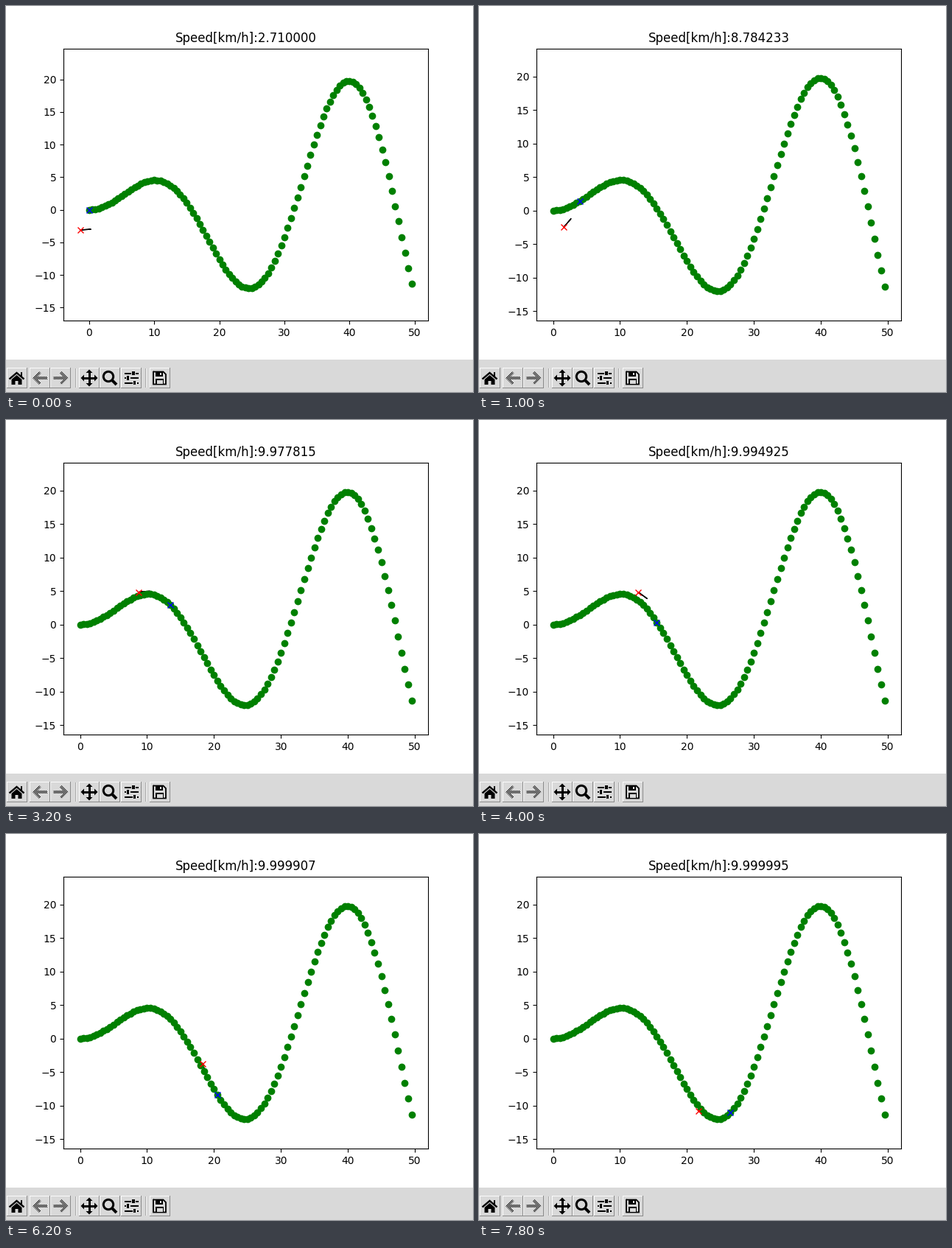
A matplotlib script for the animation above (8 s loop, 634 by 524 pixels).

```python
import math

import matplotlib.pyplot as plt
import numpy as np
from matplotlib.animation import FuncAnimation
from matplotlib.patches import Circle, Polygon, Rectangle

W, H, DPI = 634, 524, 100
FRAMES, INTERVAL = 40, 200
STEPS_PER_FRAME = 3.45
FIRST_STEP = 3

# Vehicle and controller
DT = 0.1
WHEEL_BASE = 2.9
HALF = WHEEL_BASE / 2
LOOK_GAIN = 1.0
LOOK_MIN = 2.0
TARGET_SPEED = 10 / 3.6

BAR = "#d9d9d9"

path_x = np.arange(0, 50, 0.5)
path_y = np.sin(path_x / 5) * path_x / 2


def rear_axle(x, y, yaw):
    return x - HALF * math.cos(yaw), y - HALF * math.sin(yaw)


def simulate(steps):
    """Pure pursuit run: (rear x, rear y, yaw, speed, target index) per step."""
    x, y, yaw, v, target = 0.0, -3.0, 0.0, 0.0, 0
    log = []
    for _ in range(steps + 1):
        log.append((*rear_axle(x, y, yaw), yaw, v, target))
        rx, ry = rear_axle(x, y, yaw)
        look = LOOK_GAIN * v + LOOK_MIN
        dist = np.hypot(path_x - rx, path_y - ry)
        ind = int(dist.argmin())
        while ind + 1 < len(path_x) and dist[ind] < look:
            ind += 1
        target = max(target, ind)
        alpha = math.atan2(path_y[target] - ry, path_x[target] - rx) - yaw
        x += v * math.cos(yaw) * DT
        y += v * math.sin(yaw) * DT
        yaw += v * 2 * math.sin(alpha) / look * DT
        v += (TARGET_SPEED - v) * DT
    return log


def step_at(frame):
    return FIRST_STEP + round(STEPS_PER_FRAME * frame)


states = simulate(step_at(FRAMES - 1))

fig = plt.figure(figsize=(W / DPI, H / DPI), dpi=DPI, facecolor="white")

# Toolbar, drawn in pixel coordinates with y pointing down
bar = fig.add_axes([0, 0, 1, 1], zorder=-1)
bar.set_xlim(0, W)
bar.set_ylim(H, 0)
bar.axis("off")


def rect(x0, y0, x1, y1, color="black"):
    bar.add_patch(Rectangle((x0, y0), x1 - x0, y1 - y0, color=color, lw=0, zorder=3))


def poly(points, color="black"):
    patch = Polygon(points, closed=True, fc=color, lw=0, zorder=3)
    return bar.add_patch(patch)


def line(points, width, color="black"):
    xs, ys = zip(*points)
    bar.plot(xs, ys, color=color, lw=width * 72 / DPI, zorder=3,
             solid_capstyle="butt", solid_joinstyle="miter")


def button(x, top=491, size=28):
    right, bottom = x + size, top + size
    rect(x, top, right, top + 1, "#fbfbfb")
    rect(x, top, x + 1, bottom, "#fbfbfb")
    rect(x, bottom - 1, right, bottom, "#8a8a8a")
    rect(right - 1, top, right, bottom, "#8a8a8a")


def separator(x):
    rect(x, 492, x + 1, 518, "#a8a8a8")
    rect(x + 1, 492, x + 2, 518, "#f4f4f4")


def home_icon():
    line([(4.5, 506.5), (14.5, 498), (24.5, 506.5)], 2.4)
    rect(19.5, 497, 22, 503)
    poly([(7.5, 507), (14.5, 501), (21.5, 507), (21.5, 514), (16.5, 514),
          (16.5, 509), (12.5, 509), (12.5, 514), (7.5, 514)])


def stippled_arrow(cx, side, cy=505):
    half = [(10, 0), (1, 9), (-1.5, 6.5), (3, 2), (-10, 2)]
    shape = half + [(a, -b) for a, b in reversed(half[1:])]
    clip = poly([(cx + side * a, cy + b) for a, b in shape], "none")
    x0, y0, n = int(cx) - 12, cy - 12, 24
    dots = np.indices((n, n)).sum(axis=0) % 2
    image = bar.imshow(dots, extent=(x0, x0 + n, y0 + n, y0), cmap="gray",
                       vmin=0, vmax=1 / 0.85, aspect="auto",
                       interpolation="nearest", zorder=3)
    image.set_clip_path(clip)


def pan_icon(cx=113, cy=505):
    rect(cx - 9, cy - 1.5, cx + 9, cy + 1.5)
    rect(cx - 1.5, cy - 9, cx + 1.5, cy + 9)
    for dx, dy in ((1, 0), (-1, 0), (0, 1), (0, -1)):
        tri = [(11.5, 0), (7, 4.5), (7, -4.5)]
        poly([(cx + a * dx - b * dy, cy + a * dy + b * dx) for a, b in tri])


def zoom_icon():
    bar.add_patch(Circle((139, 503), 6.7, fc="none", ec="black",
                         lw=3 * 72 / DPI, zorder=3))
    line([(143.5, 507.5), (150, 514)], 4)


def sliders_icon():
    for y, knob in ((498.5, 173), (505, 165.5), (511.5, 174.5)):
        rect(160.5, y - 1, 180, y + 1)
        rect(knob - 3, y - 2.5, knob + 3, y + 2.5, BAR)
        rect(knob - 1.7, y - 2.7, knob + 1.7, y + 2.7)


def save_icon():
    line([(200, 496.5), (213.5, 496.5), (217, 500), (217, 513.5),
          (200, 513.5), (200, 495.7)], 1.8)
    rect(203, 497, 212.5, 502.5)
    rect(208.5, 497.5, 211, 501.2, BAR)
    rect(203, 506, 214, 513)
    rect(204.5, 507.5, 212.5, 513, BAR)


rect(0, 480, W, H, BAR)
for left in (1, 32, 60, 99, 127, 155.5, 195):
    button(left)
separator(94)
separator(189)
home_icon()
stippled_arrow(46, -1)
stippled_arrow(74.5, 1)
pan_icon()
zoom_icon()
sliders_icon()
save_icon()

ax = fig.add_axes([78 / W, 96.8 / H, 495 / W, 369.6 / H])


def draw(frame):
    rx, ry, yaw, v, target = states[step_at(frame)]
    ax.clear()
    ax.plot(path_x, path_y, "go")
    ax.plot([rx], [ry], "xr")
    ax.plot([path_x[target]], [path_y[target]], "xb")
    ax.add_artist(plt.matplotlib.patches.FancyArrow(
        rx, ry, HALF * math.cos(yaw), HALF * math.sin(yaw),
        width=0.001, head_width=0.0625, head_length=0.25, fc="r", ec="k"))
    ax.axis("equal")
    ax.set_title(f"Speed[km/h]:{v * 3.6:f}")
    return []


anim = FuncAnimation(fig, draw, frames=FRAMES, interval=INTERVAL,
                     init_func=lambda: draw(0), repeat=True, repeat_delay=0,
                     blit=False)
plt.show()
```
